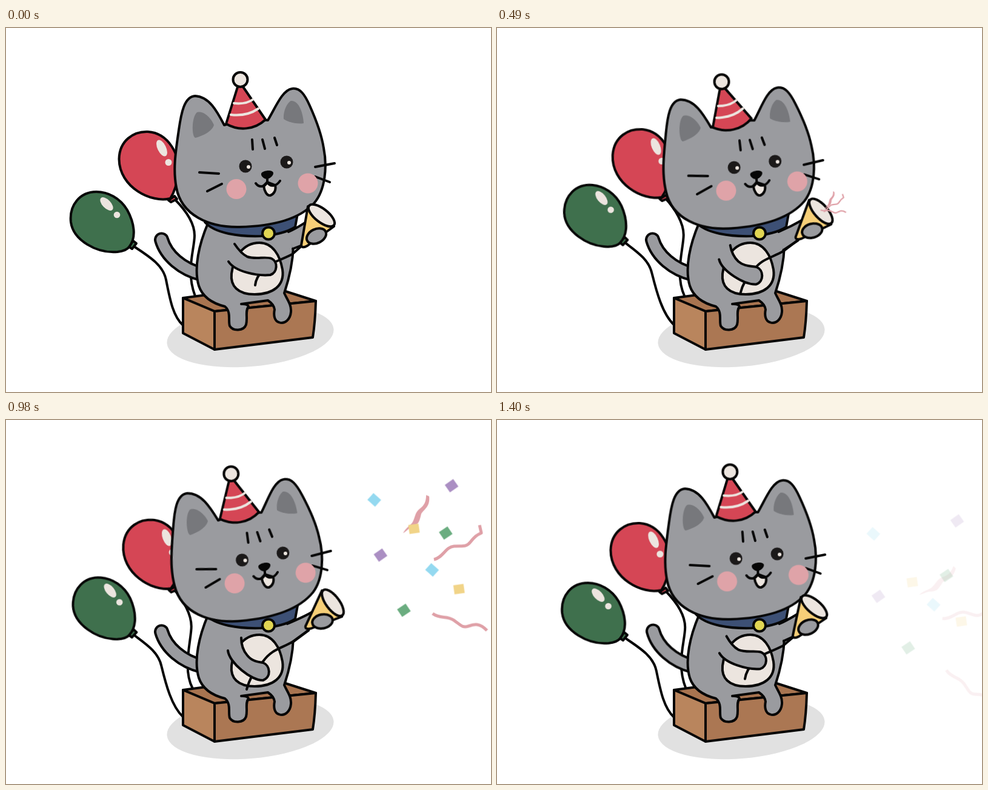
Write an HTML page without scripts that moves like this. It is 800 by 600 pixels and loops after 1470 ms.

```html
<!DOCTYPE html>
<html lang="en">
<head>
<meta charset="utf-8">
<title>Party cat</title>
<style>
html, body { margin: 0; width: 100%; height: 100%; overflow: hidden; background: #fff; }
svg { display: block; width: 800px; height: 600px; }
path, ellipse, circle { stroke-linecap: round; stroke-linejoin: round; }
.ink { stroke: #060606; stroke-width: 4; }
.line { fill: none; }
.fur { fill: #9a9b9f; }
.ear { fill: #77787c; }
.red { fill: #d54655; }
.green { fill: #3f704d; }
.cream { fill: #ece5df; }
.cheek { fill: #dfa3a8; }
.dark { fill: #1b1919; }

/* 21 poses of 70 ms; the small lead keeps step edges clear of whole poses */
.move { animation: 1470ms -5ms infinite; }

#head { animation-name: nod; transform-origin: 434px 310px; }
@keyframes nod {
  0%, 100% { transform: rotate(0deg); animation-timing-function: steps(10); }
  47.619%, 66.667% { transform: rotate(-3.9deg); animation-timing-function: steps(7); }
}
#hat { animation-name: lag; transform-origin: 396px 160px; }
@keyframes lag {
  0%, 66.667%, 100% { transform: rotate(0deg); animation-timing-function: steps(7); }
  33.333% { transform: rotate(-4.1deg); animation-timing-function: steps(7); }
}
.lid { animation-name: blink; transform-box: fill-box; transform-origin: top; animation-timing-function: step-end; }
@keyframes blink {
  0%, 85.714%, 100% { transform: scaleY(0); }
  71.429%, 80.952% { transform: scaleY(.55); }
  76.19% { transform: scaleY(1); }
}
#popper { animation-name: aim; transform-origin: 512px 343px; }
@keyframes aim {
  0%, 100% { transform: translate(0px, 0px) rotate(0deg); animation-timing-function: steps(3); }
  14.286% { transform: translate(5px, -6px) rotate(4deg); animation-timing-function: steps(7); }
  47.619%, 66.667% { transform: translate(10px, -11px) rotate(15deg); animation-timing-function: steps(7); }
}
#arm { animation-name: reach; }
@keyframes reach {
  0%, 100% { d: path("M466,336 C478,331 488,324 498,318 L491,357 L473,364"); animation-timing-function: steps(10); }
  47.619%, 66.667% { d: path("M464,336 C478,330 492,324 506,316 L499,347 L472,367"); animation-timing-function: steps(7); }
}
#cord { animation-name: pull; }
@keyframes pull {
  0%, 100% { d: path("M411,424 C412,413 418,405 425,398 C432,388 446,386 472,373 L489,358"); animation-timing-function: steps(10); }
  47.619%, 66.667% { d: path("M397,444 C402,425 412,410 424,398 C438,378 455,376 472,366 L498,347"); animation-timing-function: steps(7); }
}
#paw { animation-name: tug; }
@keyframes tug {
  0%, 100% { d: path("M377,356 C383,365 390,373 398,377 C412,382 428,376 438,380 C449,385 448,403 436,407 C415,409 378,402 367,385"); animation-timing-function: steps(10); }
  47.619%, 66.667% { d: path("M388,359 C388,370 391,380 398,388 C406,398 416,399 424,400 C436,405 438,424 424,429 C405,430 368,400 366,380"); animation-timing-function: steps(7); }
}
#tail { animation: wag 490ms -5ms infinite step-end; transform-origin: 316px 406px; }
@keyframes wag {
  0%, 100% { transform: rotate(0deg); }
  14.286%, 85.714% { transform: rotate(1deg); }
  28.571%, 71.429% { transform: rotate(3.3deg); }
  42.857% { transform: rotate(5.1deg); }
}
#redBalloon { animation-name: swayRed; transform-origin: 273px 282px; }
@keyframes swayRed {
  0%, 100% { transform: translate(0px, 0px) rotate(0deg); animation-timing-function: steps(13); }
  61.905% { transform: translate(1px, -3.5px) rotate(5.8deg); animation-timing-function: steps(8); }
}
#redString { animation-name: stringRed; }
@keyframes stringRed {
  0%, 100% { d: path("M278,282 C296,300 311,322 311,342 C311,365 296,400 312,442"); animation-timing-function: steps(13); }
  61.905% { d: path("M278,280 C292,297 305,320 305,340 C305,362 290,412 307,442"); animation-timing-function: steps(8); }
}
#greenBalloon { animation-name: swayGreen; transform-origin: 208px 356px; }
@keyframes swayGreen {
  0%, 100% { transform: translate(0px, 0px) rotate(0deg); animation-timing-function: steps(10); }
  47.619% { transform: translate(.5px, -9px) rotate(7.2deg); animation-timing-function: steps(11); }
}
#greenString { animation-name: stringGreen; }
@keyframes stringGreen {
  0%, 100% { d: path("M211,360 C235,376 259,390 264,415 C270,445 275,475 292,490"); animation-timing-function: steps(10); }
  47.619% { d: path("M211,351 C228,365 247,378 252,400 C260,430 272,470 292,489"); animation-timing-function: steps(11); }
}

/* burst from the cone to --a, on to --c, then a steady drift by --fall */
.bit { --o: 545px, 295px; --s0: 0; --s1: .47; --r1: 0deg; --r2: 0deg; --r3: 0deg; --dim: 1; animation-name: burst, fade; }
.ribbon { --s0: .45; --s1: 1; --r1: -6deg; --r2: -6deg; --r3: 22deg; --dim: .8; fill: none; stroke: #dfa0a7; stroke-width: 5; }
.ribbon path { stroke-linecap: butt; }
@keyframes burst {
  0%, 33.333% { transform: translate(var(--o)) translate(0px, 0px) rotate(var(--r1)) scale(var(--s0)); animation-timing-function: steps(3); }
  47.619% { transform: translate(var(--a)) translate(0px, 0px) rotate(var(--r1)) scale(var(--s1)); animation-timing-function: steps(2); }
  57.143% { transform: translate(var(--c)) translate(0px, 0px) rotate(var(--r2)) scale(1); animation-timing-function: steps(9); }
  100% { transform: translate(var(--c)) translate(var(--fall)) rotate(var(--r3)) scale(1); }
}
@keyframes fade {
  0% { opacity: 0; animation-timing-function: step-end; }
  33.333%, 71.429% { opacity: 1; animation-timing-function: steps(1); }
  76.19% { opacity: var(--dim); animation-timing-function: steps(5); }
  100% { opacity: 0; }
}
</style>
</head>
<body>
<svg viewBox="0 0 800 600" width="800" height="600">
  <defs>
    <rect id="chip" x="-8.5" y="-7.5" width="17" height="15"/>
    <g id="purple" fill="#ab8fc3"><use href="#chip" transform="rotate(-35)"/></g>
    <g id="blue" fill="#94d9f0"><use href="#chip" transform="rotate(42)"/></g>
    <g id="yellow" fill="#f1d488"><use href="#chip" transform="rotate(-8)"/></g>
    <g id="leaf" fill="#6bad80"><use href="#chip" transform="rotate(-34)"/></g>
  </defs>

  <ellipse cx="403" cy="508" rx="138" ry="50" transform="rotate(-5 403 508)" fill="#e1e1e1"/>

  <path id="redString" class="move ink line" d="M278,282 C296,300 311,322 311,342 C311,365 296,400 312,442"/>
  <path id="greenString" class="move ink line" d="M211,360 C235,376 259,390 264,415 C270,445 275,475 292,490"/>
  <g id="redBalloon" class="move">
    <path class="ink red" d="M268,284 l10,-7 l4,5 l-10,5Z"/>
    <path class="ink red" d="M271,281 C240,289 187,263 186.500,216 C187,186 210,170 234,171 C268,173 288,210 284,240 C282,258 278,270 271,281Z"/>
    <ellipse class="cream" cx="257" cy="198" rx="7" ry="14.5" transform="rotate(-26 257 198)"/>
    <circle class="cream" cx="268" cy="221.500" r="5.500"/>
  </g>
  <g id="greenBalloon" class="move">
    <path class="ink green" d="M202,360 l8,-9 l5,4 l-7,9Z"/>
    <path class="ink green" d="M203,361 C216,345 211,320 200,300 C188,280 168,270 149,270 C122,270 104,292 107,320 C111,350 150,372 184,369 C193,368 200,365 203,361Z"/>
    <ellipse class="cream" cx="166" cy="290" rx="7" ry="13.5" transform="rotate(-44 166 290)"/>
    <circle class="cream" cx="183" cy="308" r="5.300"/>
  </g>

  <path class="ink" fill="#a87450" d="M292,445 L345,438 L461,434 L511,450 L344,467Z"/>
  <path class="ink" fill="#b9855d" d="M292,445 L344,467 V530 L292,503Z"/>
  <path class="ink" fill="#ab7753" d="M344,467 L511,450 Q510,485 506,510 L344,530Z"/>

  <g id="tail" fill="none">
    <path stroke="#060606" stroke-width="25" d="M256.500,349 C264,375 290,398 324,406"/>
    <path stroke="#9a9b9f" stroke-width="17" d="M256.500,349 C264,375 290,398 324,406"/>
  </g>

  <path class="ink fur" d="M333,322 C319,355 309,395 318,425 C325,446 345,455 361,459 C372,468 366,482 369,491 C374,500 392,500 396,489 C399,478 394,467 400,459 C398,454 392,455 388,455 L432,449 C438,453 442,457 443,464 C441,474 443,483 450,485 C460,489 469,480 470,468 C471,456 464,448 459,437 C467,413 473,388 474,360 L472,322Z"/>
  <path class="ink cream" d="M418,354 C440,354 452,375 456,398 C460,425 440,439 410,439 C382,439 370,425 372,405 C375,380 390,354 418,354Z"/>
  <path id="arm" class="move ink fur" d="M466,336 C478,331 488,324 498,318 L491,357 L473,364"/>
  <path id="cord" class="move ink line" d="M411,424 C412,413 418,405 425,398 C432,388 446,386 472,373 L489,358"/>
  <path class="ink" fill="#3d5075" d="M328,320 C345,339 385,344 420,343 C445,341 465,336 477,328 L481,306Z"/>
  <circle class="ink" cx="433" cy="338.500" r="10" fill="#e0d553"/>
  <path id="paw" class="move ink fur" d="M377,356 C383,365 390,373 398,377 C412,382 428,376 438,380 C449,385 448,403 436,407 C415,409 378,402 367,385"/>

  <g id="head" class="move">
    <path class="ink fur" d="M360,160 C348,137 335,113 312,112 C294,113 289,140 285,168 C280,203 275,232 281,263 C289,308 334,329 385,328 C432,327 480,319 508,289 C527,267 530,228 524,198 C520,172 510,148 501,128 C493,110 485,98 472,100 C456,102 445,130 432,152 C410,150 385,152 360,160Z"/>
    <path class="ear" d="M315,139 C326,136 338,148 343,160 C340,170 325,178 312,181 C306,178 306,147 315,139Z"/>
    <path class="ear" d="M470,120 C483,119 490,140 491,157 C480,159 465,155 458,150 C457,138 463,124 470,120Z"/>
    <path class="ink line" d="M406,184 L407,200 M423,184 L427,199 M443,181 L447,193"/>
    <path class="ink line" d="M319,238 L351,240 M332,269 L356,257 M510,229 L542,223 M510,245 L534,254"/>
    <circle class="cheek" cx="380" cy="265.500" r="16.500"/>
    <circle class="cheek" cx="498" cy="256" r="16.500"/>
    <circle class="dark" cx="395" cy="228" r="10.500"/>
    <circle class="cream" cx="400" cy="229" r="3"/>
    <circle class="dark" cx="463" cy="221" r="10.500"/>
    <circle class="cream" cx="467" cy="222" r="3"/>
    <rect class="move lid fur" x="383" y="216" width="24" height="17"/>
    <rect class="move lid fur" x="451" y="209" width="24" height="17"/>
    <path class="ink cream" d="M425,260 C426,268 430,277 436,276 C442,274 446,267 444,259 L431,254Z"/>
    <path class="ink line" d="M412,256 C418,264 427,262 431,254 C436,263 446,261 452,252 M431,247 V254"/>
    <path fill="#060606" d="M421,240 C422,235 440,232 441,239 C441,245 433,249 430,249 C427,249 420,245 421,240Z"/>
    <g id="hat" class="move">
      <path class="ink red" d="M383,94 L363,158 C384,170 410,168 428,151 L389,94Z"/>
      <path class="line" stroke="#ece5df" stroke-width="4" d="M376,124 Q396,126 407,118 M371,143 Q397,146 416,133"/>
      <circle class="ink cream" cx="386.500" cy="85" r="12"/>
    </g>
  </g>

  <g id="popper" class="move">
    <path class="ink" fill="#f6cf78" d="M498,294 L487,358 Q488,364 497,359 L541,327Z"/>
    <ellipse class="ink cream" cx="520.500" cy="309" rx="26" ry="11" transform="rotate(38 520.500 309)"/>
    <ellipse class="ink fur" cx="512" cy="343" rx="17" ry="11.500" transform="rotate(-26 512 343)"/>
  </g>

  <g class="move bit ribbon" style="--o:548px,284px; --a:611px,148px; --c:659px,118px; --fall:76px,165px">
    <path fill="#dfa0a7" stroke="none" d="M17,-31 L22,-29 C24,-12 14,-8 9,0 C6,14 4,17 -3,20 C-10,22 -14,28 -21,32 C-16,23 -10,20 -6,15 C-1,8 -2,-2 6,-8 C14,-14 17,-20 17,-31Z"/>
  </g>
  <g class="move bit ribbon" style="--o:555px,288px; --a:653px,205px; --c:733px,164px; --fall:54px,167px">
    <path d="M-39,29 C-24,26 -20,8 -6,7 S14,9 21,0 S32,-12 39,-15 L36,-28"/>
  </g>
  <g class="move bit ribbon" style="--o:555px,302px; --a:668px,293px; --c:739px,297px; --fall:45px,162px; --r1:-13deg; --r2:-8deg">
    <path d="M-45,-15 C-32,-5 -22,-12 -10,-3 S4,10 14,7 S32,2 44,15"/>
  </g>
  <use class="move bit" href="#purple" style="--a:648px,144px; --c:727px,89px; --fall:36px,87px"/>
  <use class="move bit" href="#blue" style="--a:565px,163px; --c:603px,113px; --fall:20px,84px"/>
  <use class="move bit" href="#yellow" style="--a:608px,178px; --c:669px,150px; --fall:18px,132px"/>
  <use class="move bit" href="#leaf" style="--a:650px,182px; --c:720px,163px; --fall:24px,105px"/>
  <use class="move bit" href="#purple" style="--a:562px,219px; --c:614px,200px; --fall:17px,102px"/>
  <use class="move bit" href="#blue" style="--a:633px,242px; --c:697px,228px; --fall:26px,86px"/>
  <use class="move bit" href="#yellow" style="--a:668px,254px; --c:741px,261px; --fall:28px,80px"/>
  <use class="move bit" href="#leaf" style="--a:604px,268px; --c:649px,293px; --fall:33px,93px"/>
</svg>
</body>
</html>
```
